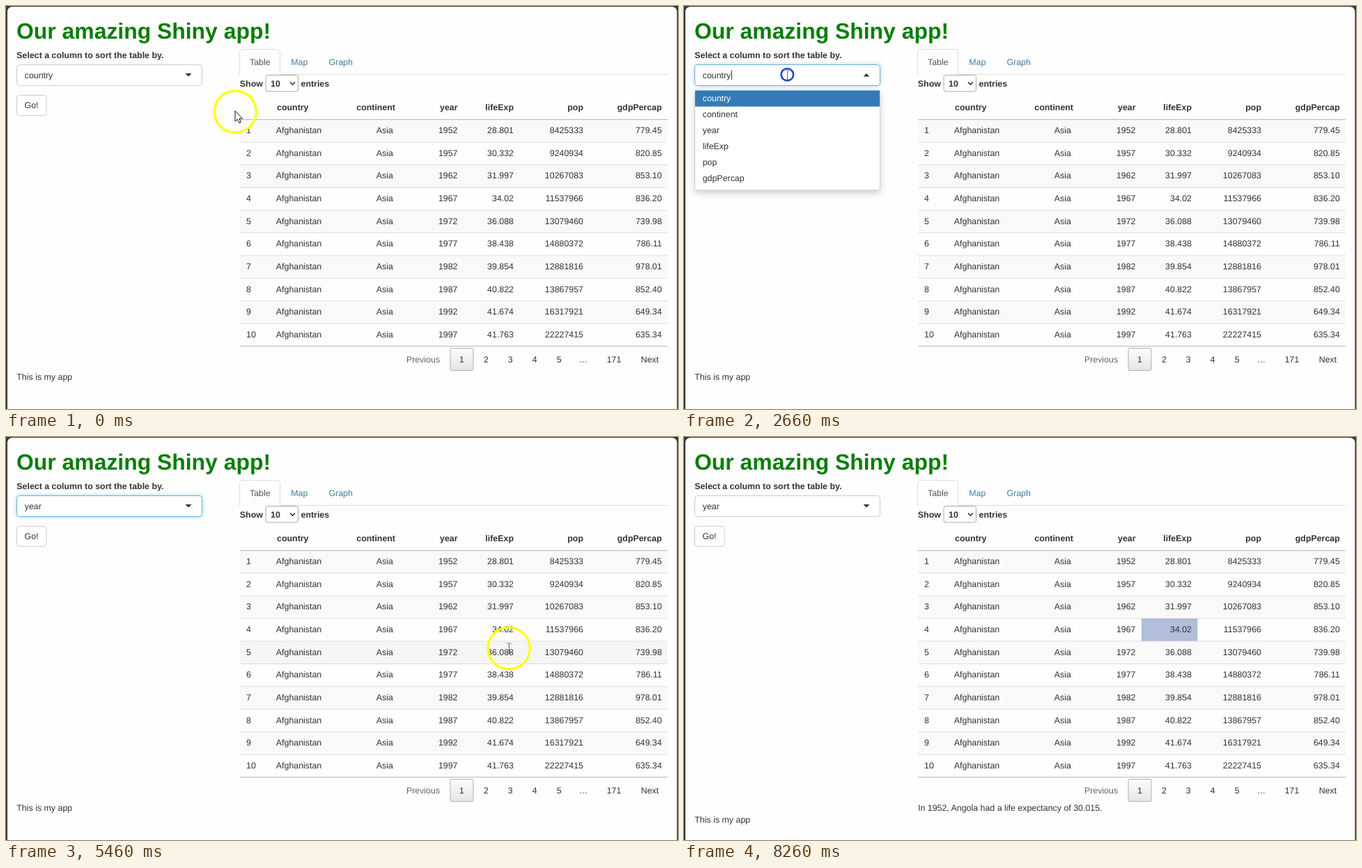
An HTML page for the animation above (8.28 s loop, 965 by 580 pixels).

```html
<!DOCTYPE html>
<html lang="en">
<head>
<meta charset="utf-8">
<title>Shiny app</title>
<style>
  html, body { margin: 0; width: 100%; height: 100%; overflow: hidden; background: #393939; }
  svg { display: block; width: 965px; height: 580px; }
  text { font: 12.4px "Liberation Sans", Arial, sans-serif; fill: #333; text-rendering: geometricPrecision; white-space: pre; }
  .bold { font-weight: bold; }
  .title { font-size: 31.9px; font-weight: bold; fill: #0a7d0a; }
  .link { fill: #437fa2; }
  .dim { fill: #666; }
  .tab { fill: #555; }
  .end { text-anchor: end; }
  .mid { text-anchor: middle; }
  .box { fill: #fff; stroke: #ccc; }
  .focus { stroke: #6ab0da; filter: drop-shadow(0 0 3px rgba(102, 175, 225, .55)); }
  .menu { fill: #fff; stroke: #d0d0d0; filter: drop-shadow(0 4px 5px rgba(0, 0, 0, .18)); }
</style>
</head>
<body>
<svg viewBox="0 0 965 580">
  <defs>
    <linearGradient id="page" x2="0" y2="1">
      <stop stop-color="#fcfcfc"/><stop offset="1" stop-color="#e6e6e6"/>
    </linearGradient>
  </defs>
  <path d="M2 580V9Q2 1 10 1H955.5Q963.5 1 963.5 9V580Z" fill="#fefefe"/>
  <g id="static"></g>
  <rect id="cell" x="657" y="261" width="80.5" height="32.6" fill="#b0bed9"/>
  <g id="labels"></g>
  <path id="residue" d="M704.5 269V285" stroke="#555"/>

  <rect id="field" class="box" x="15.5" y="84.5" width="266" height="30" rx="4"/>
  <text id="value" x="26.7" y="103.5"></text>
  <path id="caret" d="M68.5 92.5V106" stroke="#333"/>
  <path id="arrow" fill="#333"/>
  <g id="menu">
    <rect class="menu" x="15.5" y="121.5" width="266" height="143.5" rx="2"/>
    <rect id="active" x="16" width="265" height="23" fill="#337ab7"/>
  </g>
  <text id="answer" x="336" y="537.5">In 1952, Angola had a life expectancy of 30.015.</text>
  <text id="footer" x="15.3">This is my app</text>

  <circle id="click" fill="none" stroke="#2448cc" stroke-width="2.6"/>
  <g id="pointer">
    <circle id="halo" cx=".3" cy=".2" r="30" fill="none" stroke="#ffff0a" stroke-width="3.2"/>
    <path id="hand" d="M0 -1V14L3.4 11 5.9 16.4 8.3 15.3 5.9 10H10.5Z" fill="#fff" stroke="#111"/>
    <path id="beam" d="M-2.5 -7H-.5L.5 -6 1.5 -7H3.5M.5 -6V6M-2.5 7H-.5L.5 6 1.5 7H3.5" fill="none" stroke="#444" stroke-width=".8"/>
  </g>
</svg>
<script>
const LOOP = 8280, STEP = 140, ROW = 32.62, TOP = 163.4;
const columns = ["country", "continent", "year", "lifeExp", "pop", "gdpPercap"];
const life = ["28.801", "30.332", "31.997", "34.02", "36.088", "38.438", "39.854", "40.822", "41.674", "41.763"];
const pop = [8425333, 9240934, 10267083, 11537966, 13079460, 14880372, 12881816, 13867957, 16317921, 22227415];
const gdp = ["779.45", "820.85", "853.10", "836.20", "739.98", "786.11", "978.01", "852.40", "649.34", "635.34"];

const $ = id => document.getElementById(id);
function add(parent, tag, attrs, content) {
  const node = document.createElementNS("http://www.w3.org/2000/svg", tag);
  for (const key in attrs) node.setAttribute(key, attrs[key]);
  if (content !== undefined) node.textContent = content;
  return parent.appendChild(node);
}
const text = (x, y, content, style = "", parent = $("labels")) =>
  add(parent, "text", { x, y, class: style }, content);
const line = (d, stroke) => add($("static"), "path", { d, stroke, fill: "none" });
const show = (id, visible) => $(id).style.display = visible ? "" : "none";

// Sidebar
text(15, 47, "Our amazing Shiny app!", "title");
text(15.3, 75, "Select a column to sort the table by.", "bold");
add($("static"), "rect", { class: "box", x: 15.5, y: 128.5, width: 42.5, height: 29, rx: 4 });
text(26.5, 147, "Go!");

// Tabs and page length
line("M336 98.5H950", "#ddd");
add($("static"), "path", { d: "M335.5 99V66.5Q335.5 62.5 339.5 62.5H389.5Q393.5 62.5 393.5 66.5V99", fill: "#fefefe", stroke: "#ddd" });
text(350, 85, "Table", "tab");
text(409.2, 85, "Map", "link");
text(463.4, 85, "Graph", "link");
text(335.8, 115.5, "Show", "bold");
add($("static"), "rect", { class: "box", x: 373, y: 99.5, width: 46.5, height: 23.5, rx: 3, style: "stroke:#aaa" });
text(380, 115.5, "10", "bold");
line("M408 109.5L411.5 113 415 109.5", "#333").setAttribute("stroke-width", 1.6);
text(423.5, 115.5, "entries", "bold");

// Table
const rights = [434.5, 559, 648.5, 729, 829, 941.8];
columns.forEach((name, i) => text(rights[i], 149.7, name, "bold end"));
const rows = life.map((years, i) => {
  const y = TOP + i * ROW, base = 183.25 + i * ROW;
  const row = add($("static"), "rect", { x: 336, y, width: 614, height: ROW });
  text(345, base, i + 1);
  text(387.8, base, "Afghanistan");
  text(531.8, base, "Asia");
  [1952 + 5 * i, years, pop[i], gdp[i]].forEach((v, k) => text(rights[k + 2], base, v, "end"));
  return row;
});
for (let i = 0; i <= 10; i++) line(`M336 ${TOP + i * ROW}H950`, i % 10 ? "#ddd" : "#b4b4b4");

// Pagination
add($("static"), "rect", { x: 638, y: 492.5, width: 33, height: 32, rx: 2, fill: "url(#page)", stroke: "#b0b0b0" });
text(599, 512.6, "Previous", "dim mid");
["1", "2", "3", "4", "5", "…"].forEach((label, i) => text(654.5 + 34.9 * i, 512.6, label, "mid"));
text(873, 512.6, "171", "mid");
text(924.5, 512.6, "Next", "mid");

const options = columns.map((name, i) => text(26.7, 136.8 + 23.1 * i, name, "", $("menu")));

// Pointer stops: time, x, y
const path = [
  [0, 329, 152], [1260, 506, 464], [2380, 148, 99], [2800, 148, 99], [3220, 122, 176],
  [3360, 122, 176], [3640, 122, 177], [3920, 122, 177], [4200, 87, 116], [4480, 80, 112],
  [5460, 722, 304], [5740, 704, 277], [6300, 704, 277], [7000, 431, 520],
  [7280, 424, 526], [7420, 424, 526], [8260, 440, 640]
];
const presses = [[2520, 148, 99], [3780, 122, 177], [6020, 704, 277]];
const [OPEN, PICK, SELECT] = presses.map(p => p[0]);

function pointerAt(t) {
  const i = Math.max(1, path.findIndex(p => p[0] >= t));
  const [a, b] = [path[i - 1], path[i]];
  const u = (t - a[0]) / (b[0] - a[0]), e = u * u * (3 - 2 * u);
  return [a[1] + (b[1] - a[1]) * e, a[2] + (b[2] - a[2]) * e];
}

function draw(t) {
  const [x, y] = pointerAt(t);
  const open = t >= OPEN && t < PICK, answered = t >= SELECT + STEP;

  $("value").textContent = t < PICK ? "country" : "year";
  $("field").setAttribute("class", t >= OPEN && t < SELECT ? "box focus" : "box");
  $("arrow").setAttribute("d", open ? "M257.5 101.5H266.5L262 97Z" : "M257.5 97H266.5L262 101.5Z");
  show("caret", open);
  show("menu", open);
  const active = Math.max(0, Math.min(5, Math.floor((y - 121.5) / 23.1)));
  $("active").setAttribute("y", 121.7 + 23.1 * active);
  options.forEach((o, i) => o.style.fill = i === active ? "#fff" : "");

  const inTable = x > 336 && x < 950;
  const hovered = inTable ? Math.floor((y - TOP) / ROW) : -1;
  rows.forEach((row, i) => row.setAttribute("fill", i === hovered ? "#f5f5f5" : i % 2 ? "#fefefe" : "#f9f9f9"));
  show("cell", t >= SELECT);
  show("answer", answered);
  show("residue", t >= 6440 && t < 7560);
  $("footer").setAttribute("y", answered ? 555.3 : 537.5);

  const press = presses.find(p => t >= p[0] && t < p[0] + 510);
  const age = press ? t - press[0] : Infinity;
  show("click", press);
  if (press) {
    $("click").setAttribute("cx", press[1] + .3);
    $("click").setAttribute("cy", press[2] - .3);
    $("click").setAttribute("r", 4.5 + .0303 * age);
    $("click").setAttribute("opacity", Math.min(1, 1.375 - .00268 * age));
  }

  const onField = x > 16 && x < 281 && y > 85 && y < 114;
  const onNumber = hovered >= 0 && hovered < 10 && x > 690 && x < 729;
  show("halo", age >= 280);
  show("beam", onField || onNumber);
  show("hand", !(onField || onNumber));
  $("pointer").setAttribute("transform", `translate(${x} ${y})`);
}

const start = performance.now();
function tick() {
  const t = (performance.now() - start) % LOOP;
  draw(Math.floor(t / STEP) * STEP);
  requestAnimationFrame(tick);
}
tick();
</script>
</body>
</html>
```
